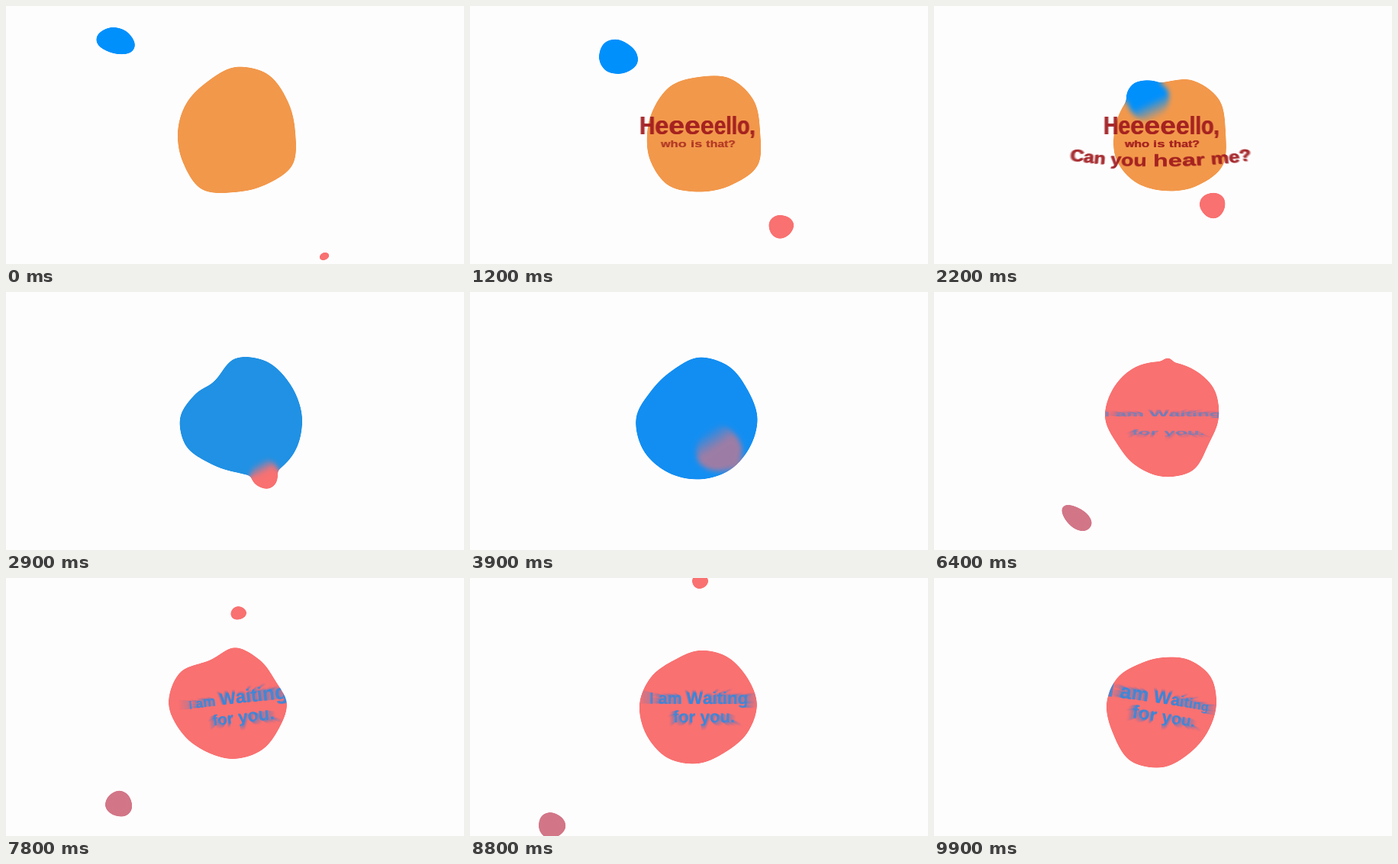
Write an HTML page with a canvas that moves like this. It is 600 px wide and 338 px high and loops after 10000 ms.

```html
<!DOCTYPE html>
<html lang="en">
<head>
<meta charset="utf-8">
<title>Blobs</title>
<style>
  html, body { margin: 0; width: 100%; height: 100%; overflow: hidden; background: #fefdfe; }
  svg, canvas { position: absolute; left: 0; top: 0; width: 600px; height: 338px; }
</style>
</head>
<body>
<svg viewBox="0 0 600 338">
  <defs>
    <filter id="goo" filterUnits="userSpaceOnUse" x="-30" y="-30" width="660" height="398" color-interpolation-filters="sRGB">
      <feGaussianBlur stdDeviation="3"/>
      <feColorMatrix values="1 0 0 0 0  0 1 0 0 0  0 0 1 0 0  0 0 0 12 -5.5"/>
    </filter>
  </defs>
  <g id="blobs" filter="url(#goo)"><path id="body"/></g>
</svg>
<canvas width="600" height="338"></canvas>
<script>
const LOOP = 10000, STEP = 100, CX = 300, CY = 165;
const ORANGE = [242, 152, 75], BLUE = [0, 144, 252], RED = [249, 113, 113];
const NS = 'http://www.w3.org/2000/svg';
const group = document.getElementById('blobs');
const body = document.getElementById('body');
const ctx = document.querySelector('canvas').getContext('2d');

const clamp = (v, lo = 0, hi = 1) => Math.min(hi, Math.max(lo, v));
const ramp = (t, a, b) => clamp((t - a) / (b - a));
const mix = (a, b, k) => a.map((v, i) => v + (b[i] - v) * k);
const rgb = c => `rgb(${c.map(Math.round)})`;

// Rows are [time, ...values]; smooth Hermite interpolation between them
function track(rows, t) {
  const last = rows.length - 1;
  if (t <= rows[0][0]) return rows[0].slice(1);
  if (t >= rows[last][0]) return rows[last].slice(1);
  const i = rows.findIndex(r => r[0] > t) - 1;
  const a = rows[i], b = rows[i + 1];
  const before = rows[Math.max(0, i - 1)], after = rows[Math.min(last, i + 2)];
  const span = b[0] - a[0], k = (t - a[0]) / span, k2 = k * k, k3 = k2 * k;
  return a.slice(1).map((v, n) => {
    const j = n + 1;
    const m0 = (b[j] - before[j]) / (b[0] - before[0]) * span;
    const m1 = (after[j] - a[j]) / (after[0] - a[0]) * span;
    return (2 * k3 - 3 * k2 + 1) * v + (k3 - 2 * k2 + k) * m0
      + (3 * k2 - 2 * k3) * b[j] + (k3 - k2) * m1;
  });
}

function closedCurve(pts) {
  const n = pts.length, at = i => pts[(i + n) % n];
  let d = `M${pts[0]}`;
  pts.forEach((p, i) => {
    const o = at(i - 1), q = at(i + 1), r = at(i + 2);
    d += `C${p[0] + (q[0] - o[0]) / 6},${p[1] + (q[1] - o[1]) / 6} `
      + `${q[0] - (r[0] - p[0]) / 6},${q[1] - (r[1] - p[1]) / 6} ${q}`;
  });
  return d + 'Z';
}

// Radii every 30 degrees, clockwise from the right
const bodyRadii = [
  [0, 79, 87, 80, 79, 87, 79, 75, 74, 75, 85, 87, 80],
  [2200, 82, 90, 83, 77, 75, 71, 64, 62, 66, 65, 78, 85],
  [2900, 88, 90, 87, 71, 68, 74, 72, 61, 55, 78, 85, 85],
  [4400, 70, 70, 76, 86, 90, 88, 84, 76, 80, 79, 74, 68],
  [4900, 65, 65, 79, 89, 92, 82, 67, 68, 81, 78, 70, 66],
  [6400, 73, 69, 79, 77, 72, 69, 76, 76, 76, 74, 75, 77],
  [7800, 68, 66, 70, 72, 73, 79, 87, 83, 66, 74, 66, 61],
  [8800, 76, 74, 72, 78, 82, 80, 78, 72, 66, 70, 72, 72],
  [9900, 70, 69, 73, 83, 86, 76, 74, 69, 61, 61, 67, 72]
];

function bodyColour(t) {
  return mix(mix(ORANGE, BLUE, ramp(t, 2250, 3000)), RED, ramp(t, 3750, 5850));
}

// Rows: time, x, y, rx, ry, rotation, opacity
const drops = [
  { colour: () => BLUE, rows: [
    [0, 144, 46, 26, 17, .25, 1],
    [1100, 187, 63, 26, 22, .3, 1],
    [2200, 280, 123, 28, 27, .2, 1],
    [2600, 296, 150, 42, 40, 0, .8],
    [2900, 303, 165, 52, 50, 0, 0]] },
  { colour: () => RED, rows: [
    [0, 417, 328, 8, 5.3, -.4, 1],
    [1100, 406, 292, 16, 15, -.2, 1],
    [1500, 412, 280, 18, 16, -.1, 1],
    [2200, 365, 261, 17, 17, 0, 1],
    [2900, 339, 239, 18, 19, 0, 1],
    [3500, 328, 215, 26, 26, 0, .8],
    [4900, 325, 188, 38, 38, 0, .1],
    [5600, 325, 185, 38, 38, 0, 0]] },
  { colour: t => bodyColour(Math.min(t, 5520)), rows: [
    [4500, 270, 225, 6, 6, .6, 0],
    [4900, 262, 244, 9, 8, .6, 1],
    [5500, 228, 279, 22, 16, .6, 1],
    [6400, 187, 296, 23, 13, .65, 1],
    [7800, 148, 296, 18, 17, .4, 1],
    [8800, 107, 324, 18, 17, .2, 1],
    [9400, 100, 364, 18, 17, 0, 1]] },
  { colour: () => RED, rows: [
    [5900, 306, 110, 5, 5, 0, 0],
    [6400, 306, 92, 7, 6, 0, 1],
    [6700, 306, 84, 8, 7, 0, 1],
    [7800, 304.5, 46, 11, 9, -.15, 1],
    [8900, 301, 0, 11, 10, 0, 1],
    [9400, 300, -24, 11, 10, 0, 1]] }
];

function add(parent, name, attrs) {
  const el = document.createElementNS(NS, name);
  for (const key in attrs) el.setAttribute(key, attrs[key]);
  return parent.appendChild(el);
}

drops.forEach((drop, i) => {
  drop.gradient = add(document.querySelector('defs'), 'linearGradient',
    { id: 'melt' + i, gradientUnits: 'userSpaceOnUse' });
  drop.stops = [.1, .95].map(offset => add(drop.gradient, 'stop', { offset }));
  drop.path = add(group, 'path', { fill: `url(#melt${i})` });
});

// The side of a drop that lies inside the body melts into it
function drawDrop(drop, t) {
  const [x, y, rx, ry, turn, opacity] = track(drop.rows, t);
  const pts = Array.from({ length: 10 }, (_, i) => {
    const a = i * Math.PI / 5, r = 1 + .05 * Math.sin(3 * a + t / 600);
    const px = rx * r * Math.cos(a), py = ry * r * Math.sin(a);
    return [x + px * Math.cos(turn) - py * Math.sin(turn),
            y + px * Math.sin(turn) + py * Math.cos(turn)];
  });
  drop.path.setAttribute('d', closedCurve(pts));
  drop.path.setAttribute('opacity', clamp(opacity));
  const dx = CX - x, dy = CY - y, dist = Math.hypot(dx, dy) || 1;
  const reach = Math.max(rx, ry) / dist;
  const line = { x1: x, y1: y, x2: x + dx * reach, y2: y + dy * reach };
  for (const key in line) drop.gradient.setAttribute(key, line[key]);
  drop.stops.forEach(s => s.setAttribute('stop-color', rgb(drop.colour(t))));
  drop.stops[1].setAttribute('stop-opacity', 1 - ramp(dist, 112, 92));
}

// Sets a line glyph by glyph through a lens, a slope and an arc
function warpedLine({ text, size, x, y, base = 1, amp = 0, lens = 0, sy = 1, slope = 0, arc = 0, grow = 0 }) {
  ctx.font = `bold ${size}px "Liberation Sans", Arial, sans-serif`;
  const advances = [...text].map(c => ctx.measureText(c).width);
  const natural = advances.reduce((a, b) => a + b, 0);
  let run = 0;
  const glyphs = advances.map((w, i) => {
    const u = (run + w / 2) / natural * 2 - 1;
    run += w;
    const sx = base * (1 + grow * u) + amp * Math.exp(-(((u - lens) / .4) ** 2));
    return { c: text[i], u, sx, w: w * sx };
  });
  const total = glyphs.reduce((a, g) => a + g.w, 0);
  let left = x - total / 2;
  for (const { c, u, sx, w } of glyphs) {
    ctx.save();
    ctx.translate(left + w / 2, y + slope * u + arc * u * u);
    ctx.rotate(Math.atan((slope + 2 * arc * u) / (total / 2)));
    ctx.scale(sx, sy * (1 + grow * u));
    ctx.fillText(c, 0, 0);
    ctx.restore();
    left += w;
  }
}

// Repeats a drawing at several scales around the middle
function zoomed(scale, alpha, draw) {
  ctx.save();
  ctx.globalAlpha = alpha;
  ctx.translate(CX, CY + 2);
  ctx.scale(scale, scale);
  ctx.translate(-CX, -CY - 2);
  draw();
  ctx.restore();
}

function drawGreeting(t) {
  if (t > 2750) return;
  const sway = .35 * Math.sin((t - 2200) / 400);
  const out = 1 - ramp(t, 2250, 2700);
  const lines = [
    { text: 'Heeeeello,', size: 33, x: 298, y: 168, base: .8, amp: .36, lens: sway - .05, from: 500 },
    { text: 'who is that?', size: 13, x: 299, y: 185, base: 1.2, amp: .25, lens: sway, from: 900 },
    { text: 'Can you hear me?', size: 23, x: 297, y: 210, base: 1.06, amp: .38, lens: sway + .18, arc: -8, sy: .95, from: 1200 }
  ];
  ctx.fillStyle = '#a01c20';
  for (const line of lines) {
    const alpha = ramp(t, line.from, line.from + 500) * out;
    if (!alpha) continue;
    zoomed(1, .6 * alpha, () => warpedLine(line));
    for (let k = -3; k <= 3; k++) zoomed(1 + k * .006, .22 * alpha, () => warpedLine(line));
  }
}

// Rows: time, x, y, grow, slope, vertical scale, width, opacity
const waiting = [
  [6000, 300, 163, 0, 0, .2, 1.3, 0],
  [6400, 300, 163, 0, 0, .45, 1.18, .6],
  [7000, 303, 164, .15, -3, .8, 1.05, .85],
  [7800, 305, 165, .3, -7, 1, 1, 1],
  [8900, 299, 165, 0, 1, 1, 1, 1],
  [9900, 293, 165, -.3, 10, 1, 1.02, 1]
];

function drawWaiting(t, outline) {
  if (t < 6000) return;
  const [x, y, grow, slope, sy, base, opacity] = track(waiting, t);
  const draw = () => {
    warpedLine({ text: 'I am Waiting', size: 22, x, y, grow, slope, sy, base });
    warpedLine({ text: 'for you.', size: 22, x: x + 7, y: y + 24, grow: grow * .4, slope: slope * .6, sy, base });
  };
  ctx.save();
  ctx.clip(new Path2D(outline));
  ctx.fillStyle = '#1c8cec';
  for (let k = 1; k <= 14; k++) zoomed(1 + k * .018, .11 * (1 - k / 15) * opacity, draw);
  zoomed(1, .72 * opacity, draw);
  ctx.restore();
}

function render(t) {
  const pts = track(bodyRadii, t).map((r, i) => {
    const a = i * Math.PI / 6;
    return [CX + r * Math.cos(a), CY + r * Math.sin(a)];
  });
  const outline = closedCurve(pts);
  body.setAttribute('d', outline);
  body.setAttribute('fill', rgb(bodyColour(t)));
  drops.forEach(drop => drawDrop(drop, t));
  ctx.clearRect(0, 0, 600, 338);
  ctx.textAlign = 'center';
  drawGreeting(t);
  drawWaiting(t, outline);
}

const start = performance.now();
function tick() {
  const t = (performance.now() - start) % LOOP;
  render(Math.floor(t / STEP) * STEP);
  requestAnimationFrame(tick);
}
tick();
</script>
</body>
</html>
```
